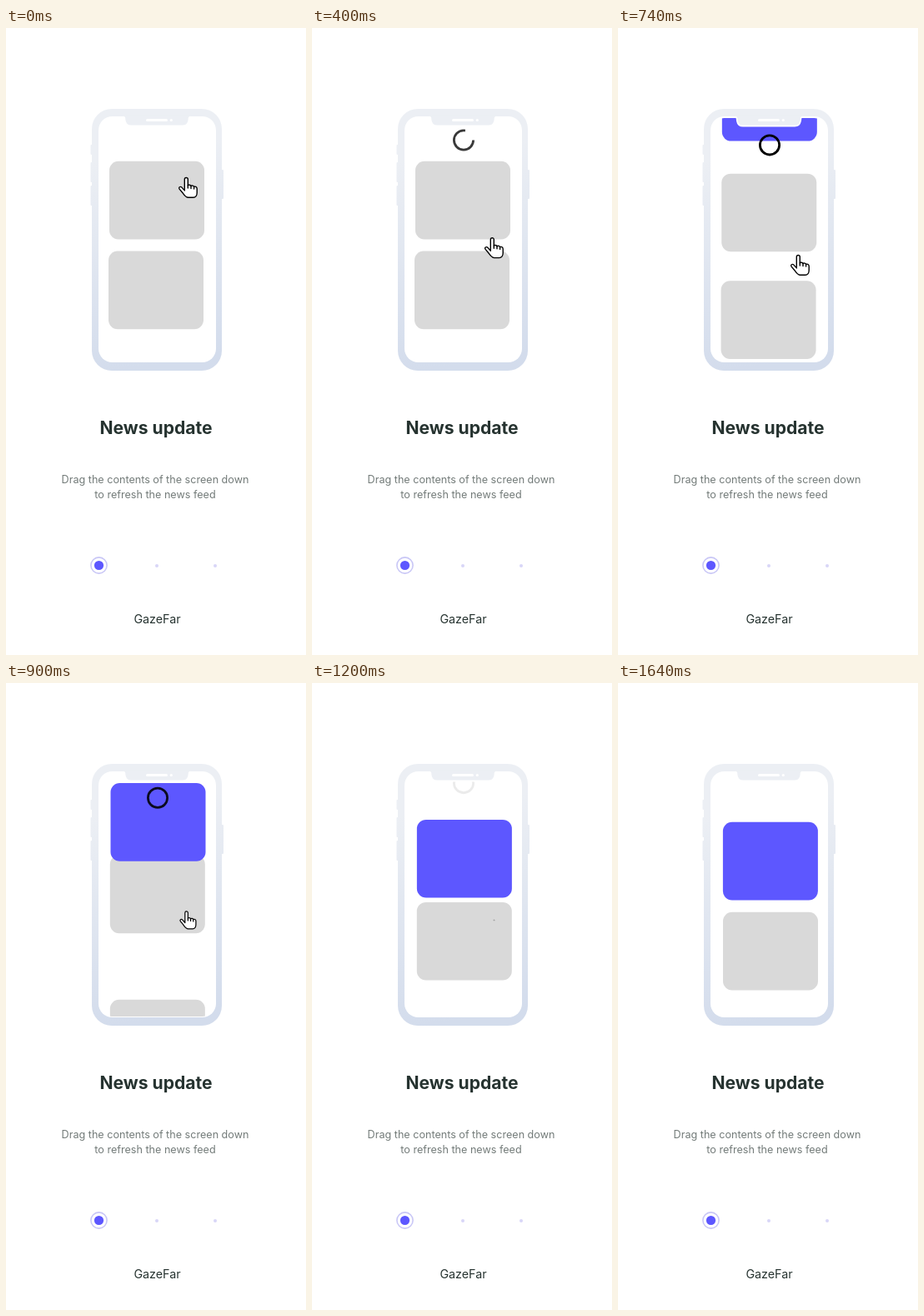
Recreate the animation shown at these times as an HTML page. Size 360x752 px, loop 5 s.

```html
<!DOCTYPE html>
<html lang="en">
<head>
<meta charset="utf-8">
<title>News update</title>
<style>
  html, body { margin: 0; height: 100%; overflow: hidden; background: #fff; }
  svg { display: block; width: 100vw; height: 100vh; }
  text { font-family: Inter, "Open Sans", sans-serif; text-anchor: middle; }
  .title { font-size: 21.1px; font-weight: 700; fill: #263330; }
  .body { font-size: 12.6px; fill: #737b79; }
  .brand { font-size: 14.3px; fill: #263330; }
</style>
</head>
<body>
<svg viewBox="0 0 360 752">
  <defs>
    <linearGradient id="metal" gradientUnits="userSpaceOnUse" x1="155" y1="150" x2="200" y2="400">
      <stop stop-color="#eceff4"/>
      <stop offset="1" stop-color="#d3dcec"/>
    </linearGradient>
    <clipPath id="screen"><rect x="112.5" y="108" width="138" height="292" rx="15"/></clipPath>
    <path id="notch" d="M140 105.5C144 106 143 108 143.6 111Q144.6 116.5 150 116.5H212Q217.4 116.5 218.4 111C219 108 218 106 222 105.5Z"/>
    <rect id="card" width="114" height="93.7" rx="11"/>
  </defs>

  <g fill="url(#metal)">
    <rect x="101.5" y="140" width="4" height="12" rx="1"/>
    <rect x="101.5" y="161" width="4" height="24" rx="1"/>
    <rect x="101.5" y="189" width="4" height="24" rx="1"/>
    <rect x="256" y="170" width="5" height="35" rx="1"/>
    <rect x="103" y="97" width="156" height="314" rx="24"/>
  </g>
  <rect x="111" y="106" width="141" height="295" rx="16.5" fill="#fff"/>

  <g clip-path="url(#screen)">
    <use id="lower" href="#card" fill="#d9d9d9"/>
    <use id="upper" href="#card" fill="#d9d9d9"/>
    <use id="fresh" href="#card" fill="#5d57ff"/>
    <circle id="ring" cx="182" r="11.6" fill="none" stroke="#000" stroke-width="2.8" pathLength="100"/>
    <use href="#notch" y=".6" fill="#fff" stroke="#fff" stroke-width="3"/>
  </g>
  <use href="#notch" fill="#eceff4"/>
  <rect x="168" y="109" width="26" height="3" rx="1.5" fill="#fff"/>
  <circle cx="198.3" cy="110.5" r="1.6" fill="#fff"/>

  <g id="hand" fill="#fff" stroke="#000" stroke-width="1.4" stroke-linejoin="round" stroke-linecap="round">
    <path d="M-4.2 3.4V-10a2 2 0 0 1 4 0V-2.8c.8-.9 3-.6 3.7.8 1-.9 3-.5 3.6.9 1.2-.7 3.6 0 3.6 2.3V6c0 3-1.6 5.8-4.4 5.8H.2c-3 0-4.9-3-6.7-5.6L-10.4 1.6c-1.4-2 .9-3.7 2.8-2z"/>
    <path d="M-.2-3V.5M3.5-2V1M7.1-1V1.6" fill="none"/>
  </g>

  <text class="title" x="180" y="486.5">News update</text>
  <text class="body" x="179" y="545.5">Drag the contents of the screen down</text>
  <text class="body" x="179" y="563.5">to refresh the news feed</text>
  <circle cx="111.5" cy="644.5" r="9.6" fill="#fff" stroke="#c9c7f6" stroke-width="1.6"/>
  <circle cx="111.5" cy="644.5" r="5.6" fill="#5d57ff"/>
  <circle cx="181" cy="645" r="2" fill="#d8d6f7"/>
  <circle cx="251" cy="645" r="2" fill="#d8d6f7"/>
  <text class="brand" x="181.5" y="714">GazeFar</text>
</svg>

<script>
const LOOP = 5000;
const [lower, upper, fresh, ring, hand] =
  ["lower", "upper", "fresh", "ring", "hand"].map(id => document.getElementById(id));

// Smooth monotone curve through [time, value] keys, at rest on both ends.
function track(...keys) {
  const slope = i => (keys[i + 1][1] - keys[i][1]) / (keys[i + 1][0] - keys[i][0]);
  const tangents = keys.map((_, i) => {
    if (i === 0 || i === keys.length - 1) return 0;
    const a = slope(i - 1), b = slope(i);
    return a * b > 0 ? 2 * a * b / (a + b) : 0;
  });
  return t => {
    if (t <= keys[0][0]) return keys[0][1];
    const i = keys.findIndex(key => key[0] > t) - 1;
    if (i < 0) return keys[keys.length - 1][1];
    const [t0, v0] = keys[i], [t1, v1] = keys[i + 1];
    const span = t1 - t0, u = (t - t0) / span, w = 1 - u;
    return v0 * w * w * (1 + 2 * u) + v1 * u * u * (3 - 2 * u)
      + span * u * w * (tangents[i] * w - tangents[i + 1] * u);
  };
}

const pull = track([0, 0], [240, 0.5], [580, 0.97], [740, 1]);
const leave = track([740, 0], [900, 0.12], [1200, 0.92], [1290, 1]);
const push = track([560, 0], [740, 0.128], [900, 0.405], [1200, 0.896], [1640, 1]);
const enter = track([560, 0], [740, 0.233], [900, 0.712], [1200, 0.982], [1560, 1]);

const place = (el, x, y, scale = 1) =>
  el.setAttribute("transform", `translate(${x} ${y}) scale(${scale})`);

function draw(t) {
  const drag = pull(t), gone = leave(t), shift = push(t), drop = enter(t);
  place(upper, 124 + 2 * shift, 159.8 + 115 * shift);
  place(lower, 123 + 4.5 * shift, 267.6 + 276 * shift);
  place(fresh, 124.5 + 1.4 * drop, 3.6 + 163.2 * drop);
  place(hand, 218.5, 191.5 + 93 * drag, 1 - gone);
  ring.setAttribute("cy", 114 + 26.4 * drag - 22 * gone);
  ring.setAttribute("stroke-dasharray", `${100 * drag} ${drag < 1 ? 100 : 0}`);
  ring.setAttribute("opacity", drag * (1 - gone));
}

function tick() {
  draw(performance.now() % LOOP);
  requestAnimationFrame(tick);
}
tick();
</script>
</body>
</html>
```
